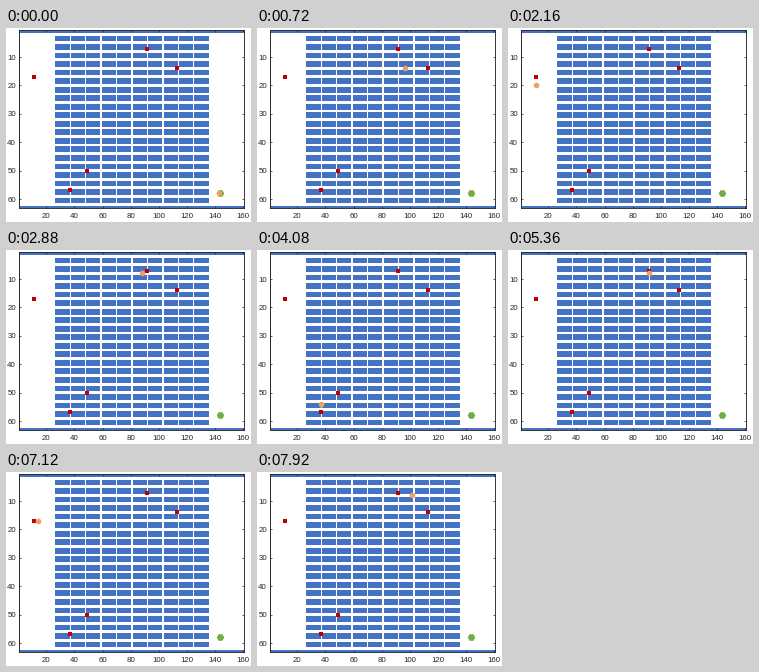
Write a matplotlib script that moves like this. It is 245 px wide and 194 px high and loops after 8 s.

```python
import itertools
from math import hypot

import matplotlib.pyplot as plt
from matplotlib.animation import FuncAnimation
from matplotlib.patches import Rectangle

W, H, DPI = 245, 194, 100
COLS, ROWS = 161, 63
FRAMES, INTERVAL, CELLS_PER_FRAME = 100, 80, 10
BLUE, RED, GREEN, ORANGE, INK = "#4472C4", "#C00000", "#70AD47", "#F2A061", "#262626"
HEADINGS = [(-1, 0), (1, 0), (0, -1), (0, 1)]

DEPOT = (144, 58)
NORTH, EAST, MID, SOUTH, WEST = (92, 7), (113, 14), (49, 50), (37, 57), (11, 17)

# Stops and a few points passed on the way; a repeated stop is a one-step wait.
ROUTE = [
    DEPOT, EAST, NORTH, MID, SOUTH, (25, 56), WEST, WEST,
    NORTH, NORTH, EAST, (79, 26), SOUTH, (15, 42), WEST, WEST,
    NORTH, NORTH, EAST, EAST, (59, 29), MID, SOUTH, WEST, WEST,
    NORTH, NORTH, (103, 8),
]


def is_open(x, y):
    """Aisles and the outer margin are open; shelves and walls are not."""
    inside = 1 < x < COLS and 1 < y < ROWS
    shelf = 27 <= x <= 135 and (x - 27) % 11 < 10 and 3 <= y <= 61 and y % 3 != 2
    return inside and not shelf


def neighbours(cell):
    return [(cell[0] + dx, cell[1] + dy) for dx, dy in HEADINGS]


def distances(goal):
    dist, queue = {goal: 0}, [goal]
    for cell in queue:
        for near in neighbours(cell):
            if near not in dist and is_open(*near):
                dist[near] = dist[cell] + 1
                queue.append(near)
    return dist


def walk(route):
    """Shortest way along the aisles, turning only when it has to."""
    cells, heading = [route[0]], HEADINGS[0]
    for start, goal in itertools.pairwise(route):
        if start == goal:
            cells.append(goal)
            continue
        dist = distances(goal)
        while cells[-1] != goal:
            x, y = cells[-1]
            closer = [(dx, dy) for dx, dy in HEADINGS
                      if dist.get((x + dx, y + dy), COLS * ROWS) < dist[x, y]]
            heading = heading if heading in closer else closer[0]
            cells.append((x + heading[0], y + heading[1]))
    return cells


def px(size):
    """Convert pixels to points."""
    return size * 72 / DPI


def block(x, y, width, height):
    ax.add_patch(Rectangle((x - 0.5, y - 0.5), width, height, color=BLUE, lw=0))


def marker(points, shape, size, color, z):
    xs, ys = zip(*points)
    return ax.plot(xs, ys, shape, ms=px(size), color=color, mew=0, zorder=z,
                   snap=False)[0]


plt.rcParams["font.family"] = "Liberation Sans"
fig = plt.figure(figsize=(W / DPI, H / DPI), dpi=DPI, facecolor="white")
left, right, top, bottom = 12.99, 238.3, 2.05, 179.53
ax = fig.add_axes([left / W, 1 - bottom / H, (right - left) / W, (bottom - top) / H])
ax.set_xlim(0.5, COLS)
ax.set_ylim(ROWS, 0.5)
ax.set_xticks(range(20, 161, 20))
ax.set_yticks(range(10, 61, 10))
ax.tick_params(direction="in", top=True, right=True, length=px(2.3), width=px(0.7),
               labelsize=px(7.9), color=INK, labelcolor=INK)
ax.tick_params(axis="x", pad=px(5.2))
ax.tick_params(axis="y", pad=px(3))
for spine in ax.spines.values():
    spine.set(linewidth=px(0.9), color=INK)

for y in (1, ROWS):
    block(1, y, COLS, 1)
for x in (1, COLS):
    block(x, 1, 1, ROWS)
for col, row in itertools.product(range(10), range(20)):
    block(27 + 11 * col, 3 + 3 * row, 10, 2)

marker([NORTH, EAST, MID, SOUTH, WEST], "s", 4.9, RED, 3)
marker([DEPOT], "H", 7.6, GREEN, 3)
robot = marker([DEPOT], "o", 5.6, ORANGE, 4)
path = walk(ROUTE)


def update(frame):
    x, y = path[1 + CELLS_PER_FRAME * frame]
    robot.set_data([x], [y])
    return [robot]


anim = FuncAnimation(fig, update, frames=FRAMES, interval=INTERVAL,
                     repeat=True, repeat_delay=0, blit=False)
plt.show()
```
